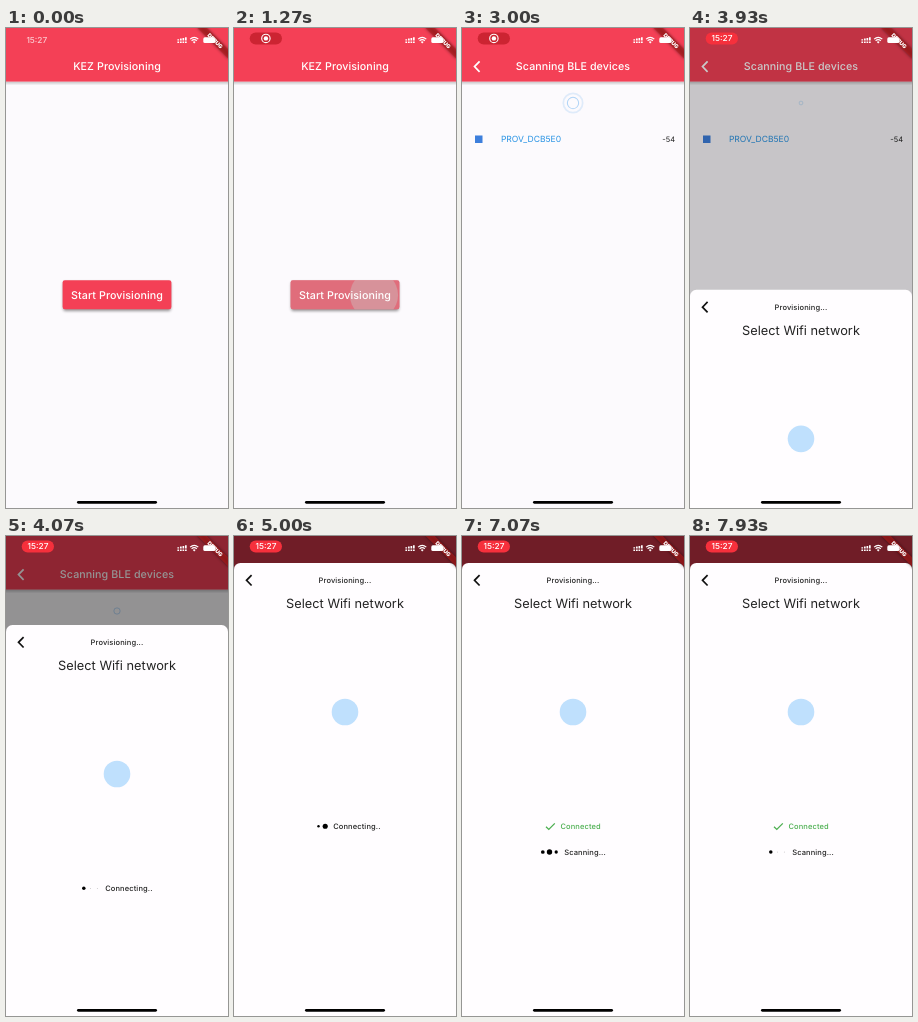
Write an HTML page that moves like this. It is 222 px wide and 480 px high and loops after 8000 ms.

```html
<!DOCTYPE html>
<html lang="en">
<head>
<meta charset="utf-8">
<title>Provisioning</title>
<style>
  html, body { margin: 0; width: 100%; height: 100%; overflow: hidden; background: #fcfafd; }
  svg { display: block; width: 100%; height: 100%; }
  text { font-family: Inter, Roboto, sans-serif; text-rendering: geometricPrecision; white-space: pre; }
  .title { font-size: 10.7px; font-weight: 500; letter-spacing: .08px; fill: #fff; text-anchor: middle; }
  .small { font-size: 7.5px; font-weight: 500; letter-spacing: .12px; }
  .time { font-size: 8.3px; font-weight: 500; fill: #fff; text-anchor: middle; }
  .line { fill: none; stroke-width: 1.7; }
</style>
</head>
<body>
<svg viewBox="0 0 222 480">
  <defs>
    <linearGradient id="barShade" x2="0" y2="1">
      <stop offset="0" stop-color="#000" stop-opacity=".22"/>
      <stop offset="1" stop-color="#000" stop-opacity="0"/>
    </linearGradient>
    <filter id="soft" x="-30%" y="-80%" width="160%" height="260%"><feGaussianBlur stdDeviation="1.5"/></filter>
    <clipPath id="btnClip"><rect x="56.6" y="252.2" width="108.8" height="29" rx="2.2"/></clipPath>
    <g id="pageBase">
      <rect width="222" height="480" fill="#fcfafd"/>
      <rect y="53.6" width="222" height="3.8" fill="url(#barShade)"/>
      <rect width="222" height="53.6" fill="#f44056"/>
    </g>
  </defs>

  <g id="home">
    <use href="#pageBase"/>
    <text class="title" x="111" y="42.2">KEZ Provisioning</text>
    <rect x="57.2" y="254" width="107.6" height="29" rx="2" opacity=".42" filter="url(#soft)"/>
    <g clip-path="url(#btnClip)">
      <rect x="56" y="252" width="110" height="30" fill="#f44056"/>
      <rect id="press" x="56" y="252" width="110" height="30" fill="#bcbcbc"/>
      <circle id="splash" cx="140" cy="267" fill="#c8c8c8"/>
    </g>
    <text class="title" x="111" y="270.6">Start Provisioning</text>
  </g>

  <g id="scan">
    <rect id="edge" x="-3" width="6" height="480" opacity=".12" filter="url(#soft)"/>
    <use href="#pageBase"/>
    <path class="line" d="M17.6 33.4 12.5 38.6 17.6 43.8" stroke="#fff"/>
    <text class="title" x="111" y="42.2">Scanning BLE devices</text>
    <g fill="none" stroke="#3b9cee"><circle class="ring" cx="111" cy="75"/><circle class="ring" cx="111" cy="75"/></g>
    <g id="device">
      <rect x="13" y="107.5" width="7.5" height="7.5" fill="#3d7fdc"/>
      <text x="38.9" y="114.3" font-size="8.55" fill="#2a94e4">PROV_DCB5E0</text>
      <text x="213" y="114" font-size="7.5" text-anchor="end" fill="#222">-54</text>
    </g>
  </g>

  <rect id="barrier" width="222" height="480"/>

  <g id="sheet">
    <rect y="27" width="222" height="480" rx="6.4" fill="#fffdff"/>
    <path class="line" d="M17.6 39.1 12.5 44.3 17.6 49.5" stroke="#111"/>
    <text class="small" x="111" y="46.8" text-anchor="middle" fill="#222">Provisioning...</text>
    <text x="111" y="71.8" font-size="12.8" text-anchor="middle" fill="#222">Select Wifi network</text>
    <circle cx="111" cy="176" r="13.3" fill="#bfe0fd"/>
    <g id="connecting">
      <g class="dots"></g>
      <text class="small" x="99.2" y="292.9" fill="#222">Connecting..</text>
    </g>
    <g id="scanning">
      <path d="M84 290.8 86.8 293.4 92.8 287.4" fill="none" stroke="#4caf50" stroke-width="1.3"/>
      <text class="small" x="98.4" y="292.9" fill="#4caf50">Connected</text>
      <g class="dots"></g>
      <text class="small" x="102.2" y="318.7" fill="#222">Scanning...</text>
    </g>
  </g>

  <g transform="translate(222 0) rotate(45)">
    <rect x="-22" y="15" width="44" height="6.4" opacity=".5" filter="url(#soft)"/>
    <rect x="-22" y="15" width="44" height="6.4" fill="#b71c1c" opacity=".627"/>
    <text y="20.2" font-size="5.5" font-weight="900" text-anchor="middle" fill="#fff">DEBUG</text>
  </g>

  <g id="status">
    <rect id="pill" x="15.7" y="4.5" width="32.3" height="12" rx="6"/>
    <text id="clock" class="time">15:27</text>
    <g id="rec"><circle cx="31.9" cy="10.4" r="4.2" fill="none" stroke="#fff" stroke-width="1.1"/><circle cx="31.9" cy="10.4" r="2.2" fill="#fff"/></g>
    <g fill="#fff">
      <path d="M171.4 11.2h1.7v1.3h-1.7zM174 10.6h1.7v1.9H174zM176.5 9.9h1.7v2.6h-1.7zM179 9.2h1.7v3.3H179z"/>
      <path d="M171.4 13.6h1.7v1.5h-1.7zM174 13.6h1.7v1.5H174zM176.5 13.6h1.7v1.5h-1.7zM179 13.6h1.7v1.5H179z"/>
      <path d="M188.2 15.4 186.8 13.9Q188.2 12.8 189.6 13.9Z"/>
      <path d="M185.6 12.7Q188.2 10.5 190.8 12.7M184.1 11.1Q188.2 7.5 192.3 11.1" fill="none" stroke="#fff" stroke-width="1.2"/>
      <rect x="197.3" y="9.3" width="11.8" height="5.8" rx="1.6"/>
    </g>
  </g>
  <rect x="71" y="473" width="80" height="2.7" rx="1.35"/>
</svg>

<script>
const LOOP = 8000;
const TAP = 1060, PUSH = 1500, RIPPLE = 1920, FOUND = 2400;
const SHEET = 3819, CONNECT = 4000, CONNECTED = 6460;

const $ = id => document.getElementById(id);
const set = (el, attrs) => { for (const k in attrs) el.setAttribute(k, attrs[k]); };
const show = (el, on) => set(el, { visibility: on ? 'inherit' : 'hidden' });
const ramp = (t, start, length) => Math.min(1, Math.max(0, (t - start) / length));
const easeOut = (p, power) => 1 - (1 - p) ** power;
const mix = (a, b, p) => a + (b - a) * p;
const rings = document.querySelectorAll('.ring');

function makeDots(group, x, y) {
  return [0, 1, 2].map(i => {
    const dot = document.createElementNS('http://www.w3.org/2000/svg', 'circle');
    set(dot, { cx: x + i * 6.7, cy: y });
    group.append(dot);
    return dot;
  });
}
const [connectDots, scanDots] = [['connecting', 77.8, 290.3], ['scanning', 80.8, 316]]
  .map(([id, x, y]) => makeDots($(id).querySelector('.dots'), x, y));

function bounce(dots, t) {
  dots.forEach((dot, i) => {
    const scale = (Math.sin(2 * Math.PI * (t / 1400 - i * 0.2)) + 1) / 2;
    set(dot, { r: 2.68 * scale });
  });
}

function drawRipple(t) {
  const phase = t < 0 ? 0 : t / 1800 % 1;
  rings.forEach((ring, i) => {
    const p = ramp(phase, i * 0.25, 0.75);
    const width = 2.2 * p;
    set(ring, { r: Math.max(0, 13.2 * p - width / 2), 'stroke-width': width, opacity: p ? 0.75 * (1 - p) : 0 });
  });
}

function drawStatus(t) {
  const on = ramp(t, 70, 400), back = ramp(t, 3530, 250);
  const icon = ramp(t, 250, 300) * (1 - back);
  const color = [mix(204, 246, back), mix(36, 48, back), mix(50, 60, back)].map(Math.round);
  set($('pill'), { fill: `rgb(${color})`, opacity: on });
  set($('rec'), { opacity: icon });
  set($('clock'), { x: mix(30.8, 32, back), y: mix(15.3, 13.4, back), opacity: Math.max(0.72 * (1 - on), back) });
}

function draw(t) {
  const push = easeOut(ramp(t, PUSH, 500), 3);
  set($('home'), { transform: `translate(${-74 * push} 0)` });
  set($('scan'), { transform: `translate(${222 * (1 - push)} 0)` });
  show($('scan'), push > 0);
  show($('edge'), push < 1);

  set($('press'), { opacity: 0.36 * ramp(t, TAP, 150) });
  set($('splash'), {
    r: 24 * ramp(t, TAP, 210) + 30 * ramp(t, 1270, 300),
    opacity: 0.4 * ramp(t, TAP, 75) * (1 - ramp(t, 1350, 200))
  });

  drawRipple(t - RIPPLE);
  show($('device'), t >= FOUND);

  const rise = ramp(t, SHEET, 400);
  set($('barrier'), { opacity: 0.54 * easeOut(rise, 1.5) });
  set($('sheet'), { transform: `translate(0 ${453 * (1 - easeOut(rise, 2))})` });
  show($('sheet'), rise > 0);
  show($('connecting'), t < CONNECTED);
  show($('scanning'), t >= CONNECTED);
  bounce(connectDots, t - CONNECT);
  bounce(scanDots, t - CONNECTED);

  drawStatus(t);
}

const start = performance.now();
function tick() {
  draw((performance.now() - start) % LOOP);
  requestAnimationFrame(tick);
}
tick();
</script>
</body>
</html>
```
